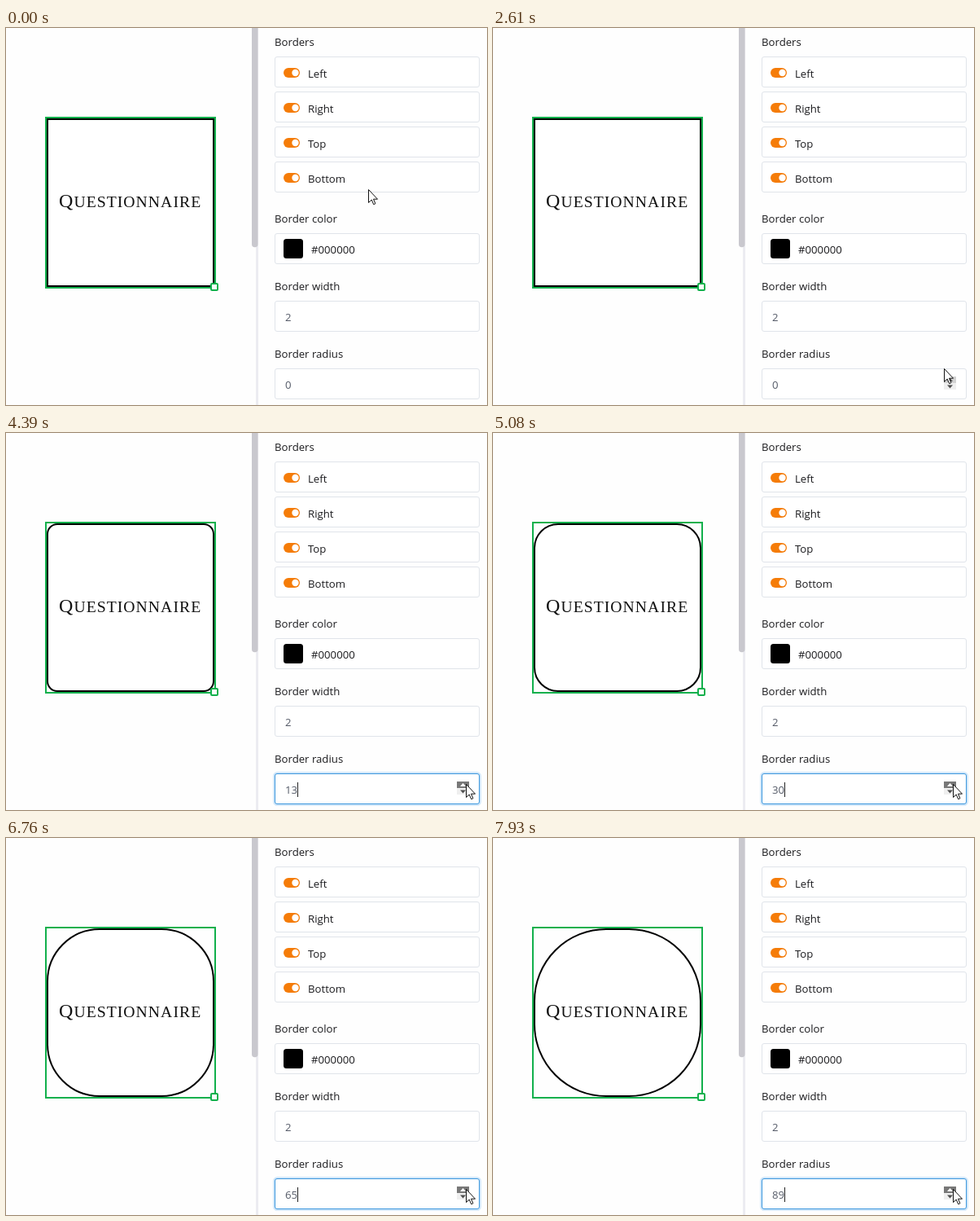
Recreate the animation shown at these times as an HTML page. Size 591 px wide and 463 px high, loop 8000 ms.

```html
<!DOCTYPE html>
<html lang="en">
<head>
<meta charset="utf-8">
<title>Border radius</title>
<style>
  html, body { margin: 0; width: 100%; height: 100%; overflow: hidden; background: #fefefe; }
  svg { display: block; }
  text { font: 13.2px "Open Sans", "Noto Sans", sans-serif; fill: #1c1c1f; }
  .value { fill: #555b68; }
  .title { font: 19.7px "Liberation Serif", serif; letter-spacing: 1.04px; fill: #111; }
  .initial { font-size: 24px; }
  .field { fill: #fff; stroke: #e0e4ea; }
  .green { stroke: #12b04c; stroke-width: 2; }
</style>
</head>
<body>
<svg width="591" height="463" viewBox="0 0 591 463">
  <path d="M307 0h3v463h-3z" fill="#ececf1"/>
  <path d="M302 0h7.5v265.500a3.500 3.500 0 0 1-7.500 0z" fill="#c9c8ce"/>

  <rect class="green" x="49" y="110" width="208" height="209" fill="none"/>
  <rect id="shape" x="51" y="112" width="204" height="205" fill="#fff" stroke="#000" stroke-width="2"/>
  <rect class="green" x="252" y="314" width="8" height="8" rx="1" fill="#fff"/>
  <text class="title" x="65" y="220"><tspan class="initial">Q</tspan>UESTIONNAIRE</text>

  <g id="panel"></g>
  <g id="focus">
    <rect x="329.500" y="417.500" width="253" height="39" rx="4" fill="none" stroke="#d3e8fa" stroke-width="3"/>
    <rect x="330.500" y="418.500" width="251" height="37" rx="2.500" fill="#fff" stroke="#3a96dd"/>
    <path id="caret" d="M0 429v18" stroke="#222"/>
  </g>
  <text id="radius" class="value" x="343" y="443"></text>
  <g id="spinner">
    <path id="upButton" d="M554 428h15v8h-15z"/>
    <path d="M554 436h15v8h-15z" fill="#efefef"/>
    <path id="upArrow" d="M558 434l3.500-4 3.500 4z"/>
    <path d="M558 438.500l3.500 4 3.500-4z" fill="#505050"/>
  </g>
  <path id="cursor" d="M.5.5v16l3.700-3.500 2.500 5.700 2.200-1-2.400-5.500h5z" fill="#fff" stroke="#111"/>
</svg>
<script>
const LOOP = 8000, PRESS = 3580;
const $ = id => document.getElementById(id);

const label = (text, y) => `<text x="330" y="${y}">${text}</text>`;
const field = y => `<rect class="field" x="330.5" y="${y + .5}" width="251" height="37" rx="2.5"/>`;
const toggle = (name, i) => {
  const y = 35 + 43 * i;
  return field(y) +
    `<rect x="341" y="${y + 14}" width="20" height="12" rx="6" fill="#f57c08"/>
     <circle cx="355.5" cy="${y + 20}" r="4.2" fill="#fff"/>
     <text x="371" y="${y + 26}">${name}</text>`;
};

$("panel").innerHTML =
  label("Borders", 22) + ["Left", "Right", "Top", "Bottom"].map(toggle).join("") +
  label("Border color", 239) + field(252) +
  `<rect x="341" y="259" width="24" height="24" rx="3.5"/><text x="375" y="277">#000000</text>` +
  label("Border width", 322) + field(335) + `<text class="value" x="343" y="360">2</text>` +
  label("Border radius", 405) + field(418);

// Keys: [time, x, y] and [step, radius]
const cursorKeys = [[270, 445, 198], [790, 446, 232], [1310, 440, 273], [1440, 446, 300],
  [1570, 460, 333], [2480, 553, 423], [2740, 555, 413], [3130, 564.500, 431]];
const radiusKeys = [[0, 1], [1, 2], [11, 30], [16, 45], [23, 65], [32, 89]];

function sample(keys, at, column) {
  if (at <= keys[0][0]) return keys[0][column];
  const next = keys.findIndex(key => key[0] >= at);
  if (next < 0) return keys[keys.length - 1][column];
  const a = keys[next - 1], b = keys[next];
  return a[column] + (b[column] - a[column]) * (at - a[0]) / (b[0] - a[0]);
}

function draw(t) {
  const moveTime = 400 + Math.floor((t - 400) / 130) * 130;
  const x = Math.round(sample(cursorKeys, moveTime, 1));
  const y = Math.round(sample(cursorKeys, moveTime, 2));
  $("cursor").setAttribute("transform", `translate(${x} ${y})`);

  const pressed = t >= PRESS;
  const radius = pressed ? Math.round(sample(radiusKeys, Math.floor((t - PRESS) / 135.9), 1)) : 0;
  $("shape").setAttribute("rx", Math.max(0, radius - 1));
  $("radius").textContent = radius;

  $("focus").style.display = pressed ? "" : "none";
  const caretX = Math.floor(343 + 7.55 * String(radius).length) + .5;
  $("caret").setAttribute("transform", `translate(${caretX} 0)`);

  $("spinner").style.display = t >= 2610 ? "" : "none";
  $("upButton").setAttribute("fill", pressed ? "#787878" : "#d2d2d2");
  $("upArrow").setAttribute("fill", pressed ? "#fff" : "#505050");
}

function frame() {
  draw(performance.now() % LOOP);
  requestAnimationFrame(frame);
}
frame();
</script>
</body>
</html>
```
